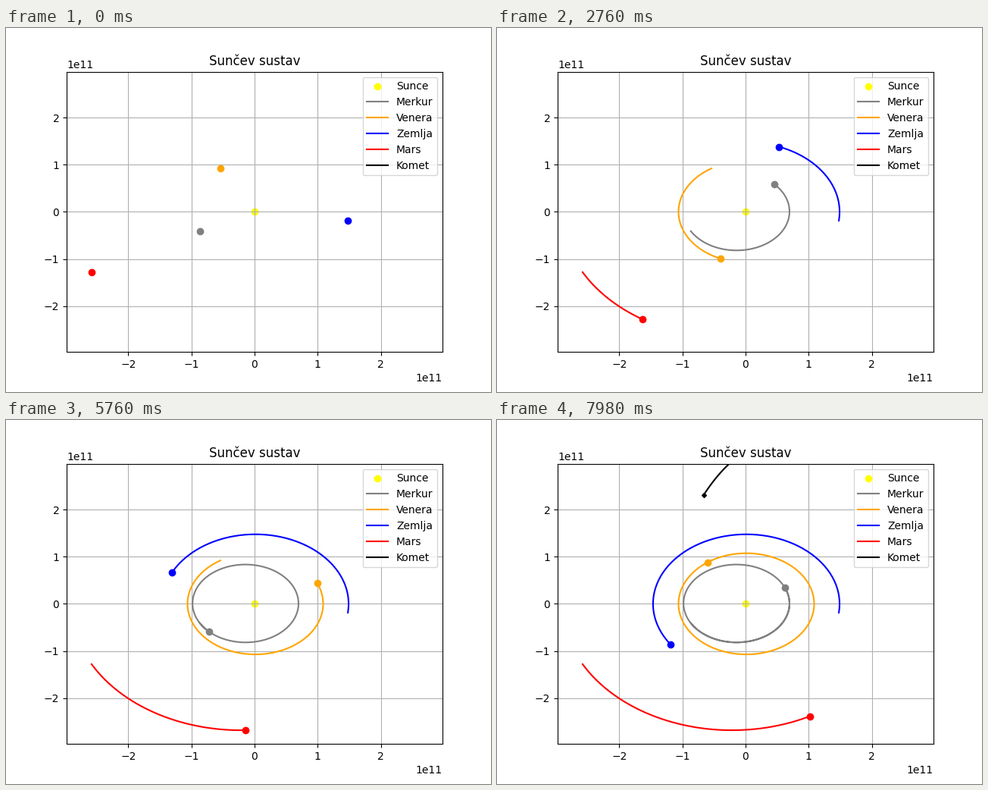
These frames come from a looping animation (640x480 px, 8 s). A matplotlib script:

```python
import numpy as np
import matplotlib.pyplot as plt
from matplotlib.animation import FuncAnimation

TICK = 20                 # ms per drawn frame
LOOP = 8000
HOLD = 3                  # drawn frames per simulation step
STEPS = -(-LOOP // (TICK * HOLD))
UNIT = 1e11               # metres
LIMIT = 2.975 * UNIT

# label, colour, semi-major axis, eccentricity, perihelion angle,
# mean anomaly at start, mean motion per step (angles in degrees)
PLANETS = [
    ("Merkur", "gray", 0.839, 0.171, -3, 218.8, 3.937),
    ("Venera", "orange", 1.0736, 0.0112, 180, -58.5, 2.735),
    ("Zemlja", "blue", 1.4765, 0.008, 175, -182.3, 1.676),
    ("Mars", "red", 2.692, 0.0796, 0, 210.7, 0.6816),
]


def kepler_orbit(a, e, peri, m0, motion):
    """Positions on an elliptic orbit around the Sun, one per step."""
    mean = np.radians(m0 + motion * np.arange(STEPS))
    ecc = mean.copy()
    for _ in range(8):
        ecc -= (ecc - e * np.sin(ecc) - mean) / (1 - e * np.cos(ecc))
    x = a * (np.cos(ecc) - e)
    y = a * np.sqrt(1 - e * e) * np.sin(ecc)
    w = np.radians(peri)
    return UNIT * np.array([x * np.cos(w) - y * np.sin(w),
                            x * np.sin(w) + y * np.cos(w)])


def comet_path():
    """Nearly uniform fall towards the Sun, entering through the top edge."""
    s = np.arange(STEPS) - 111.0
    x = -0.318 - 0.01634 * s + 3.6e-5 * s**2
    y = 2.896 - 0.0221 * s - 1.93e-4 * s**2
    path = UNIT * np.array([x, y])
    path[:, s < -12] = np.nan
    return path


fig, ax = plt.subplots(figsize=(6.4, 4.8), dpi=100)
ax.set_xlim(-LIMIT, LIMIT)
ax.set_ylim(-LIMIT, LIMIT)
ax.set_title("Sunčev sustav")
ax.grid(True)
ax.scatter([0], [0], color="yellow", label="Sunce")

bodies = []


def add_body(label, color, path, marker="o", size=6):
    trail, = ax.plot([], [], color=color, label=label)
    dot, = ax.plot([], [], marker, color=color, markersize=size)
    bodies.append((path, trail, dot))


for label, color, *elements in PLANETS:
    add_body(label, color, kepler_orbit(*elements))
add_body("Komet", "black", comet_path(), "D", 3)
ax.legend(loc="upper right")


def update(frame):
    step = frame // HOLD
    artists = []
    for path, trail, dot in bodies:
        trail.set_data(path[:, :step + 1])
        dot.set_data(path[:, step:step + 1])
        artists += [trail, dot]
    return artists


anim = FuncAnimation(fig, update, frames=LOOP // TICK, interval=TICK,
                     repeat=True, repeat_delay=0, init_func=lambda: update(0))
plt.show()
```
